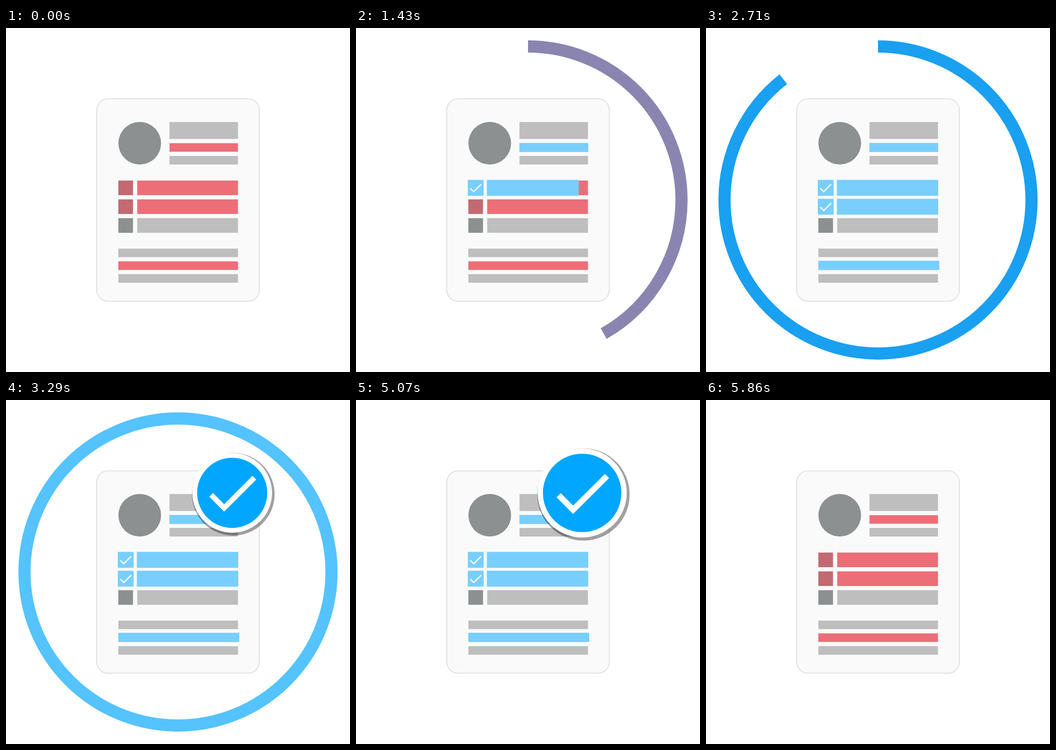
An HTML page with a canvas for the animation above (5930 ms loop, 640x640 px).

```html
<!DOCTYPE html>
<html lang="en">
<head>
<meta charset="utf-8">
<title>Document check</title>
<style>
  html, body { margin: 0; width: 100%; height: 100%; overflow: hidden; background: #fff; }
  canvas { display: block; width: 640px; height: 640px; }
</style>
</head>
<body>
<canvas id="stage"></canvas>
<script>
const canvas = document.getElementById('stage');
const ctx = canvas.getContext('2d');
const ratio = window.devicePixelRatio || 1;
canvas.width = canvas.height = 640 * ratio;

const LOOP = 5930, FPS = 14, CENTER = 320;
const GREY = '#bebebe', DARK = '#8c9090', RED = '#ec6e78', DARK_RED = '#c26a71';
const SKY = '#78cfff', BLUE = '#00a6ff';
const RING_FROM = [237, 110, 120], RING_TO = [0, 166, 255];

const progress = (t, start, length) => Math.min(1, Math.max(0, (t - start) / length));
const outQuart = p => 1 - (1 - p) ** 4;
const outBack = (p, c = 3.05) => p ? 1 + (c + 1) * (p - 1) ** 3 + c * (p - 1) ** 2 : 0;

function box(color, left, top, right, bottom) {
  ctx.fillStyle = color;
  ctx.fillRect(left, top, right - left, bottom - top);
}

function disc(color, x, y, r) {
  ctx.fillStyle = color;
  ctx.beginPath();
  ctx.arc(x, y, r, 0, 2 * Math.PI);
  ctx.fill();
}

function tick(width, ...points) {
  ctx.beginPath();
  points.forEach(([x, y]) => ctx.lineTo(x, y));
  ctx.strokeStyle = '#fff';
  ctx.lineWidth = width;
  ctx.stroke();
}

function scaled(x, y, s, draw) {
  if (s <= 0) return;
  ctx.save();
  ctx.translate(x, y);
  ctx.scale(s, s);
  ctx.translate(-x, -y);
  draw();
  ctx.restore();
}

function paper() {
  ctx.beginPath();
  ctx.roundRect(168.8, 131.8, 302.5, 376.5, 21);
  ctx.fillStyle = '#fafafa';
  ctx.fill();
  ctx.strokeStyle = '#dedede';
  ctx.lineWidth = 1.6;
  ctx.stroke();
}

function content() {
  const right = 431.6;
  disc(DARK, 248.8, 214.4, 39.7);
  box(GREY, 304.2, 174.9, right, 206.4);
  box(RED, 304.2, 214.3, right, 230.2);
  box(GREY, 304.2, 238, right, 254);
  [[DARK_RED, RED], [DARK_RED, RED], [DARK, GREY]].forEach(([square, bar], i) => {
    const y = 283.8 + i * 35;
    box(square, 209, y, 236.3, y + 27.2);
    box(bar, 244.1, y, right, y + 27.2);
  });
  [GREY, RED, GREY].forEach((color, i) => {
    const y = 410.4 + i * 23.8;
    box(color, 209, y, right, y + 15.9);
  });
}

function fillBar(t, start, left, top, right, bottom) {
  const p = outQuart(progress(t, start, 500));
  if (p) box(SKY, left, top, left + (right - left) * p, bottom);
}

function listRow(t, start, y) {
  scaled(222.8, y + 14.8, outBack(progress(t, start, 400)), () => {
    box(SKY, 208, y, 237.5, y + 29.6);
    tick(2.2, [212.6, y + 15.6], [219, y + 22], [232.8, y + 8.2]);
  });
  fillBar(t, start + 205, 243.4, y, 432, y + 29.6);
}

function badge(t) {
  const x = 420.8, y = 172.8;
  scaled(x, y, outQuart(progress(t, 3071.4, 500)), () => {
    disc('rgba(0,0,0,.37)', x + 2.4, y + 2.8, 86);
    disc('#fff', x, y, 83);
    disc(BLUE, x, y, 73);
    tick(11, [377, 177], [404, 204.2], [467, 141.2]);
  });
}

function ring(t) {
  const p = progress(t, 300, 2700);
  const alpha = 1 - progress(t, 3142.9, 428.5);
  if (!p || !alpha) return;
  const rgb = RING_FROM.map((v, i) => Math.round(v + (RING_TO[i] - v) * p));
  ctx.globalAlpha = alpha;
  ctx.strokeStyle = `rgb(${rgb})`;
  ctx.lineWidth = 22.6;
  ctx.beginPath();
  ctx.arc(CENTER, CENTER, 285.6, -Math.PI / 2, (2 * p - 0.5) * Math.PI);
  ctx.stroke();
  ctx.globalAlpha = 1;
}

function draw(t) {
  ctx.setTransform(ratio, 0, 0, ratio, 0, 0);
  box('#fff', 0, 0, 640, 640);
  ring(t);

  // Once the finished sheet has shrunk away, an empty one fills in again.
  if (t >= 5499) {
    paper();
    ctx.globalAlpha = progress(t, 5642.9, 214.2);
    content();
    ctx.globalAlpha = 1;
    return;
  }
  scaled(CENTER, CENTER, 1 - progress(t, 5003, 497) ** 4, () => {
    paper();
    content();
    fillBar(t, 500, 304, 213.8, 432, 230.6);
    listRow(t, 1000, 282.6);
    listRow(t, 1700, 317.7);
    fillBar(t, 2200, 209, 433.1, 434, 450.3);
    badge(t);
  });
}

// Motion advances in 14 steps per second, each starting on a 10 ms mark.
function stepTime(ms) {
  const step = Math.floor((Math.floor(ms / 10) + 0.5) * FPS / 100);
  return step * 1000 / FPS;
}

const begin = performance.now();
function frame() {
  draw(stepTime((performance.now() - begin) % LOOP));
  requestAnimationFrame(frame);
}
frame();
</script>
</body>
</html>
```
